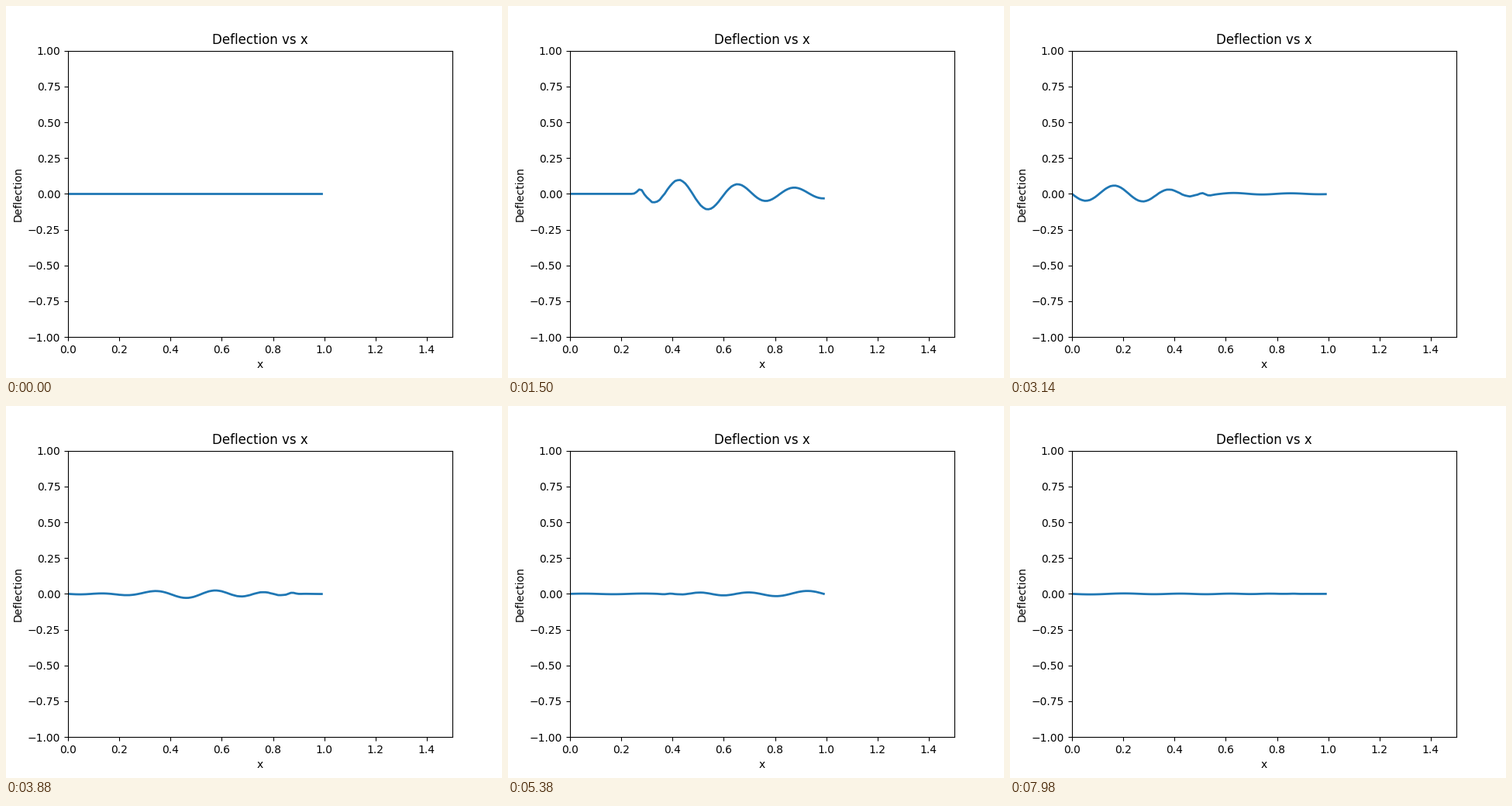
These frames come from a looping animation (640 by 480 pixels, 8000 ms). A matplotlib script:

```python
import numpy as np
import matplotlib.pyplot as plt
from matplotlib.animation import FuncAnimation

FRAMES = 400
NODES = 100

# Per-step constants of a damped string on an elastic bed
COURANT2 = 0.98 ** 2
BED = 0.0225
DAMPING = 0.02


def drive(n):
    """Decaying shake of the right end."""
    return 0.3 * np.exp(-0.03 * n) * np.sin(np.pi * n / 10)


def simulate():
    u = np.zeros((FRAMES, NODES))
    u[1, -1] = drive(1)
    half = DAMPING / 2
    for n in range(1, FRAMES - 1):
        now, mid = u[n], u[n, 1:-1]
        bend = now[2:] - 2 * mid + now[:-2]
        u[n + 1, 1:-1] = (2 * mid - (1 - half) * u[n - 1, 1:-1]
                          + COURANT2 * bend - BED * mid) / (1 + half)
        u[n + 1, -1] = drive(n + 1)
    return u


x = np.arange(NODES) * 0.01
shape = simulate()

fig, ax = plt.subplots(figsize=(6.4, 4.8), dpi=100)
ax.set(xlim=(0, 1.5), ylim=(-1, 1), xlabel="x", ylabel="Deflection",
       title="Deflection vs x")
line, = ax.plot(x, shape[0], lw=2)


def update(n):
    line.set_ydata(shape[n])
    return line,


anim = FuncAnimation(fig, update, frames=FRAMES, interval=20, repeat=True)
plt.show()
```
